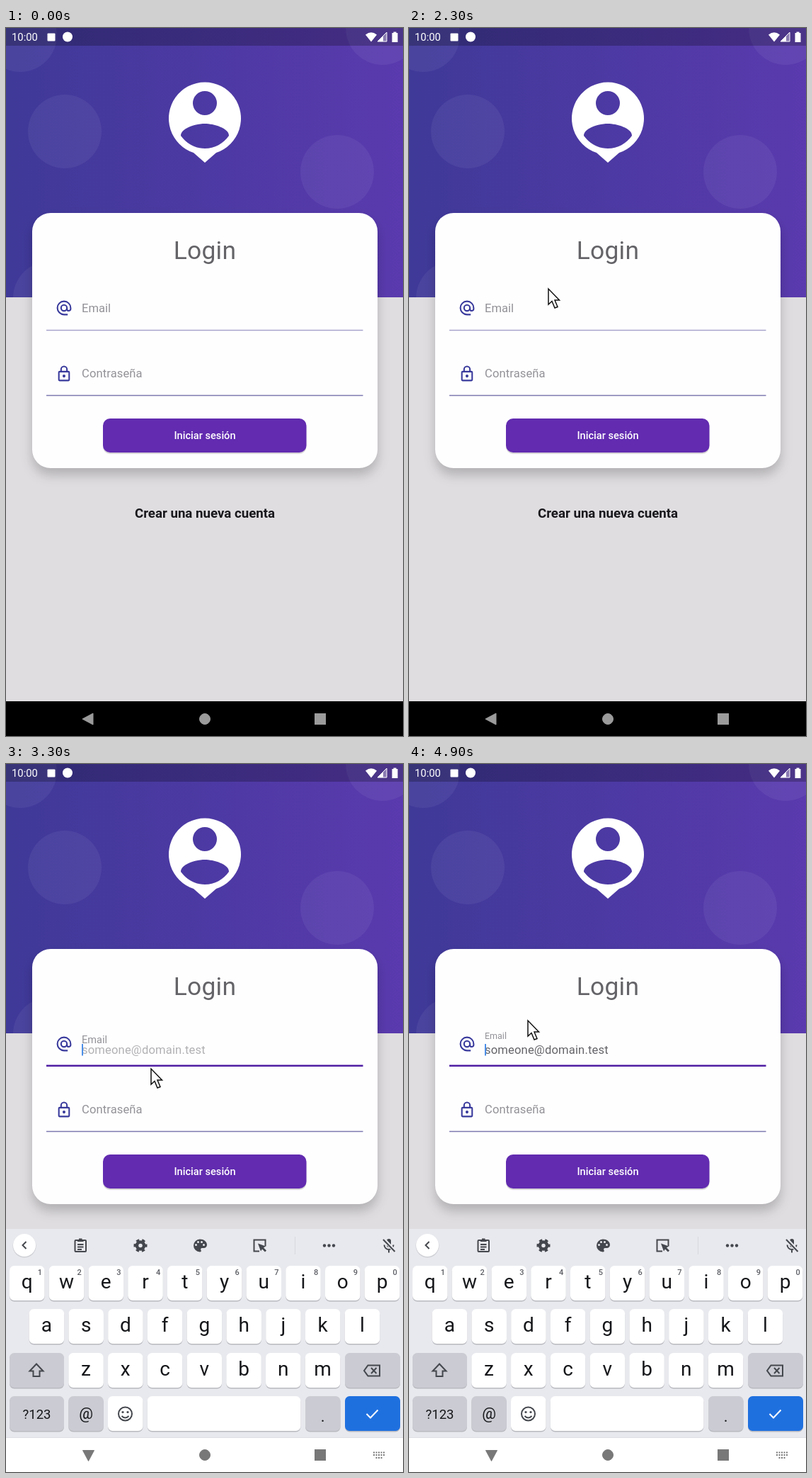
These frames come from a looping animation (561 px wide and 999 px high, 5000 ms). An HTML page:

```html
<!DOCTYPE html>
<html lang="es">
<head>
<meta charset="utf-8">
<title>Login</title>
<style>
html, body { margin: 0; width: 100%; height: 100%; overflow: hidden; background: #dfdde0; }
svg { display: block; width: 561px; height: 999px; font-family: Roboto, sans-serif; }
.mid { text-anchor: middle; }
.line { fill: none; stroke: currentColor; stroke-width: 2; }
</style>
</head>
<body>
<svg viewBox="0 0 561 999">
  <defs>
    <linearGradient id="sky">
      <stop stop-color="#3f3998"/>
      <stop offset="1" stop-color="#5a3aae"/>
    </linearGradient>
    <filter id="soft" x="-10%" y="-10%" width="120%" height="125%">
      <feGaussianBlur stdDeviation="8"/>
    </filter>
    <clipPath id="header"><path d="M0 0h561v380H0z"/></clipPath>
  </defs>

  <rect width="561" height="999" fill="#dfdde0"/>
  <g clip-path="url(#header)">
    <rect width="561" height="380" fill="url(#sky)"/>
    <g fill="#fff" fill-opacity=".055">
      <circle cx="20" cy="10" r="52"/>
      <circle cx="83" cy="146" r="52"/>
      <circle cx="468" cy="203" r="52"/>
      <circle cx="532" cy="0" r="52"/>
      <circle cx="62" cy="381" r="52"/>
    </g>
  </g>
  <path fill="#fff" fill-rule="evenodd" d="M265 176a51 51 0 1 1 32 0L281 190z
    M264 106a17 17 0 1 0 34 0a17 17 0 1 0-34 0z
    M247 152C247 141 269 135 281 135S315 141 315 152C307 163 295 170 281 170S255 163 247 152z"/>

  <!-- status bar -->
  <rect width="561" height="25" fill="#000" fill-opacity=".24"/>
  <g fill="#fff">
    <text x="8" y="18" font-size="14.8">10:00</text>
    <rect x="58.500" y="7.500" width="11" height="11" rx="1"/>
    <circle cx="87" cy="12.500" r="7"/>
    <path d="M508 9.500q8-6.500 16 0L516 19.500z"/>
    <path d="M525 19L538 6v13z" fill-opacity=".35"/>
    <path d="M525 19l8-8v8z"/>
    <path d="M538 6v13h-13z" fill="none" stroke="#fff"/>
    <path d="M547.500 5.500h4v1.500h2v13h-8V7h2z"/>
  </g>

  <!-- card -->
  <rect x="37" y="270" width="488" height="361" rx="26" fill-opacity=".2" filter="url(#soft)"/>
  <rect x="37" y="261" width="488" height="360" rx="26" fill="#fffeff"/>
  <text class="mid" x="281" y="325.500" font-size="35.4" letter-spacing=".2" fill="#646468">Login</text>
  <g color="#393a9c">
    <g class="line" transform="translate(69.500 382.500) scale(1.04)">
      <circle cx="12" cy="12" r="4"/>
      <path d="M17 21h-5a9 9 0 1 1 9-9v1.400a2.500 2.500 0 0 1-5 0V12"/>
    </g>
    <g class="line" transform="translate(69.500 475.500) scale(1.04)">
      <rect x="5" y="9" width="14" height="12" rx="1"/>
      <path d="M8 9V6a4 4 0 0 1 8 0v3"/>
      <circle cx="12" cy="15" r="1"/>
    </g>
  </g>
  <g fill="#929297" font-size="16.6">
    <text id="label" x="107">Email</text>
    <text x="107" y="493" letter-spacing=".1">Contraseña</text>
    <text id="hint" x="107" y="409" fill="#646468" letter-spacing=".15">someone@domain.test</text>
  </g>
  <path id="rule" d="M57 426.500H504.500"/>
  <path d="M57 518.500H504.500" stroke="#7d78b0" stroke-width="1.300"/>
  <rect id="caret" x="107" y="395" width="2" height="16.500" fill="#4a8fe8"/>
  <rect x="137" y="553" width="287.500" height="48" rx="10" fill-opacity=".16"/>
  <rect x="137" y="551" width="287.500" height="48" rx="10" fill="#622bb0"/>
  <text class="mid" x="281" y="580" font-size="14.6" font-weight="500" fill="#fff">Iniciar sesión</text>
  <text class="mid" x="281" y="690.500" font-size="18.7" font-weight="700" fill="#19181c">Crear una nueva cuenta</text>

  <rect y="950" width="561" height="49" fill="#000"/>

  <!-- keyboard -->
  <g id="board">
    <rect y="656" width="561" height="294" fill="#e8e9ee"/>
    <rect y="950" width="561" height="60" fill="#fff"/>
    <path d="M0 950.500H561" stroke="#dedfe4"/>
    <g id="keys" class="mid"></g>
    <g color="#44474d" fill="#44474d">
      <circle cx="26" cy="680" r="16.500" fill="#cfd0d6"/>
      <circle cx="26" cy="679" r="16" fill="#fff"/>
      <path class="line" d="M28.500 674l-5 5 5 5"/>
      <g class="line">
        <rect x="97.500" y="672" width="15.500" height="16" rx="1"/>
        <path d="M101 673h8.500M101 678h8.500M101 681.500h8.500M101 685h6M103 670.500h4.500"/>
      </g>
      <circle cx="190" cy="679.500" r="5" fill="none" stroke="currentColor" stroke-width="4.500"/>
      <circle cx="190" cy="679.500" r="8" fill="none" stroke="currentColor" stroke-width="3"
        stroke-dasharray="4.400 3.978" stroke-dashoffset="2.200"/>
      <path d="M274 670.500a9 9 0 0 0 0 18c2 0 2-1.500 1.500-2.500c-1-1.500 0-3 1.500-3h2.500a4.500 4.500 0 0 0 4.500-4.500c0-4.500-4.500-8-10-8z"/>
      <g fill="#e8e9ee">
        <circle cx="268.500" cy="678.500" r="1.500"/><circle cx="271.500" cy="674.500" r="1.500"/>
        <circle cx="276.500" cy="674.500" r="1.500"/><circle cx="279.500" cy="678.500" r="1.500"/>
      </g>
      <path class="line" d="M358 687.500h-7.500v-16h16v9"/>
      <path d="M356 676.500l11 4-3 2 4 4-2 2-4-4-2 3z"/>
      <path d="M408.500 667v25" stroke="#d8d9df"/>
      <circle cx="450" cy="679.500" r="2.200"/><circle cx="456.500" cy="679.500" r="2.200"/><circle cx="463" cy="679.500" r="2.200"/>
      <rect x="538" y="670" width="6" height="12" rx="3"/>
      <path class="line" d="M534.500 678.500a6.500 6.500 0 0 0 13 0M541 685v4.500"/>
      <path d="M533 670l17 18" stroke="#e8e9ee" stroke-width="5"/>
      <path class="line" d="M533 671l16.500 17"/>
      <path class="line" d="M43 846.500l9.500 10h-5v7.500h-9v-7.500h-5z"/>
      <path class="line" stroke-width="1.800" d="M506 856l5.500-7.500h16.500v15h-16.500zM516 852l7.500 8M523.500 852l-7.500 8"/>
      <g class="line">
        <circle cx="168.500" cy="917" r="9.500"/>
        <path d="M163.500 920q5 5 10 0"/>
      </g>
      <circle cx="165" cy="914.500" r="1.600"/><circle cx="172" cy="914.500" r="1.600"/>
      <path class="line" style="stroke:#fff" d="M509.500 917l5.500 5.500 10.500-11"/>
    </g>
  </g>

  <!-- navigation -->
  <g id="nav">
    <path id="back" d="M108 975l15-8v16z"/>
    <circle cx="281" cy="975" r="7.500"/>
    <rect x="436.500" y="967.500" width="15" height="15"/>
    <path id="toggle" fill="none" stroke-width="2" stroke-dasharray="2 1.500"
      d="M519 971.500h17M519 975h17M522.500 979h9"/>
  </g>

  <path id="mouse" d="M0 0V22L5 17.500L9 27L13 25.500L9 16H15.500Z" fill="#fff" stroke="#111" stroke-width="1.500"/>
</svg>

<script>
const $ = id => document.getElementById(id);
const set = (id, attrs) => {
  for (const name in attrs) $(id).setAttribute(name, attrs[name]);
};
const clamp = v => Math.max(0, Math.min(1, v));
const mix = (a, b, p) => a + (b - a) * p;

// Keyboard layout
const STEP = 55.75, WHITE = '#fff', GREY = '#cbccd3';
let keys = '';
function key(x, y, w, fill, text = '', size = 28, base = 32) {
  const rect = (dy, color) =>
    `<rect x="${x}" y="${y + dy}" width="${w}" height="49" rx="6.500" fill="${color}"/>`;
  keys += rect(1.5, '#b9bac0') + rect(0, fill) +
    `<text x="${x + w / 2}" y="${y + base}" font-size="${size}" fill="#16171a">${text}</text>`;
}
function row(letters, x, y) {
  [...letters].forEach((c, i) => key(x + i * STEP, y, 49.5, WHITE, c));
}
row('qwertyuiop', 5, 708);
for (let i = 0; i < 10; i++)
  keys += `<text x="${48 + i * STEP}" y="721" font-size="11" font-weight="500" fill="#5c5e64">${(i + 1) % 10}</text>`;
row('asdfghjkl', 32.7, 769);
row('zxcvbnm', 88.3, 831);
key(5, 831, 77, GREY);
key(479, 831, 78, GREY);
key(5, 892, 77, GREY, '?123', 18.5, 32);
key(88.3, 892, 49.5, GREY, '@', 22, 32);
key(144, 892, 49.5, WHITE);
key(199.8, 892, 216.5, WHITE);
key(423, 892, 49.5, GREY, '.', 22, 36);
key(479, 892, 78, '#1f70df');
$('keys').innerHTML = keys;

// Pointer path: time, x, y
const path = [
  [200, 400, 763], [600, 322, 480], [1100, 304, 416], [2300, 197, 368],
  [3000, 206, 403], [3200, 221, 466], [3500, 173, 358], [4900, 168, 362]
];
function pointer(t) {
  const i = Math.max(1, path.findIndex(p => p[0] >= t));
  const a = path[i - 1], b = path[i];
  const p = clamp((t - a[0]) / (b[0] - a[0]));
  return [mix(a[1], b[1], p), mix(a[2], b[2], p)];
}

function draw(t) {
  const [x, y] = pointer(t);
  set('mouse', { transform: `translate(${x} ${y})`, visibility: t < 200 ? 'hidden' : 'visible' });

  const rise = clamp((t - 3050) / 242);
  set('board', { transform: `translate(0 ${343 * (1 - rise) ** 2})`, visibility: rise ? 'visible' : 'hidden' });
  const grey = mix(155, 120, rise), color = `rgb(${grey},${grey},${grey})`;
  set('nav', { fill: color, stroke: color });
  set('back', { transform: `rotate(${-90 * rise} 116.500 975)` });
  set('toggle', { visibility: t >= 3000 ? 'visible' : 'hidden' });

  const float = clamp((t - 3220) / 160);
  set('label', { y: mix(400.5, 388, float), 'font-size': mix(16.6, 12.5, float) });
  set('hint', { opacity: float });
  set('rule', float
    ? { stroke: '#4f1fa3', 'stroke-width': 2.4, transform: 'translate(0 -.8)' }
    : { stroke: '#a6a3ca', 'stroke-width': 1.6, transform: '' });
  const blink = (t - 2900) % 1000 < 500;
  set('caret', { visibility: t >= 3150 && blink ? 'visible' : 'hidden' });
}

function tick() {
  draw(Math.floor(performance.now() % 5000 / 100) * 100);
  requestAnimationFrame(tick);
}
tick();
</script>
</body>
</html>
```
